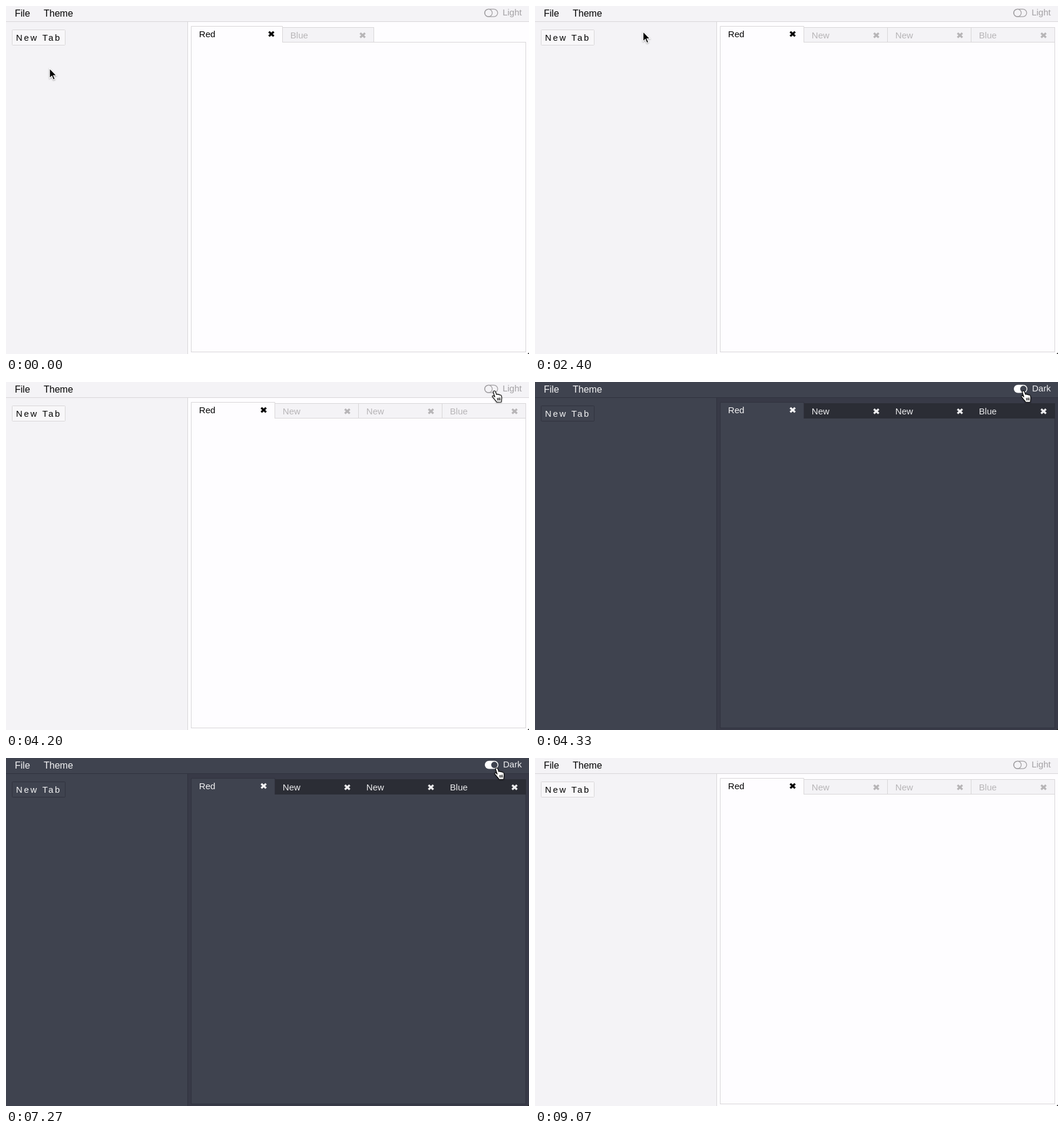
Write an HTML page that moves like this. It is 888x591 px and loops after 9.14 s.

```html
<!DOCTYPE html>
<html lang="en">
<head>
<meta charset="utf-8">
<title>Tabs and themes</title>
<style>
html, body { margin: 0; width: 100%; height: 100%; overflow: hidden; }
svg { display: block; width: 100%; height: 100%; font: 15px "Liberation Sans", Arial, sans-serif; }
#app {
  --bar: #f4f3f6; --page: #fefdff; --line: #d8d6d8; --btn: #f8f7f9;
  --text: #000; --tab: #f4f3f6; --tabline: #d8d6d8; --dim: #b7b5b7; --label: #a3a1a4;
}
#app.dark {
  --bar: #3f434f; --page: #3f434f; --line: #30323e; --btn: #3f434f;
  --text: #f4f4f5; --tab: #2b2d35; --tabline: #2b2d35; --dim: #ececee; --label: #f0f0f2;
}
.back { fill: var(--page); }
.dark .back { fill: #383a47; }
.bar { fill: var(--bar); }
.line { fill: none; stroke: var(--line); }
.page { fill: var(--page); stroke: var(--line); }
.btn { fill: var(--btn); stroke: var(--line); }
.menu { font-size: 16px; }
.menu, .front text, .btntext { fill: var(--text); }
.btntext { letter-spacing: 2.7px; }
.tab rect { fill: var(--tab); stroke: var(--tabline); }
.tab text { fill: var(--dim); }
.x { fill: none; stroke: var(--dim); stroke-width: 3.4; }
.front .x { stroke: var(--text); }
.label { fill: var(--label); text-anchor: end; }
.off { fill: none; stroke: var(--label); stroke-width: 1.3; }
.on, .dark .off { display: none; }
.dark .on { display: inline; }
.arrow { stroke: #fff; stroke-width: 1.2; }
.hand { fill: #fff; stroke: #000; stroke-width: 1.1; stroke-linejoin: round; stroke-linecap: round; }
#cursor { filter: drop-shadow(0 1px 1px rgba(0, 0, 0, .35)); }
</style>
</head>
<body>
<svg id="app" viewBox="0 0 888 591" preserveAspectRatio="none">
  <rect class="back" width="888" height="591"/>
  <path class="bar" d="M0 0H888V27H309V591H0Z"/>
  <path class="line" d="M0 26.5H888M308.5 27V591"/>
  <text class="menu" x="15" y="17.5">File</text>
  <text class="menu" x="64" y="17.5">Theme</text>
  <rect class="btn" x="10.5" y="40.5" width="90" height="26" rx="1"/>
  <text class="btntext" x="17" y="58.7">New Tab</text>

  <g class="off">
    <rect x="812.8" y="5.3" width="22" height="12.8" rx="6.4"/>
    <circle cx="819.2" cy="11.7" r="6.4"/>
  </g>
  <g class="on">
    <rect x="813" y="4.8" width="23" height="13.8" rx="6.9" fill="#fff"/>
    <circle cx="829.2" cy="11.7" r="5.4" fill="#3f434f"/>
  </g>
  <text class="label" id="label" x="875.7" y="16.4"></text>

  <rect class="page" x="314.5" y="61.5" width="568" height="526"/>
  <g id="tabs"></g>
  <path d="M888 588.5V591H885.5Z" fill="#222"/>

  <g id="cursor">
    <path class="arrow" id="arrow" d="M0 0V16.6L3.8 13L6.4 19.3L9.2 18.1L6.6 12H11.8Z"/>
    <g class="hand" id="hand" transform="translate(-6 -1)">
      <path d="M3.3 1.2C4.6 .6 5.6 1.2 6.1 2.5L7.8 7.2C8.6 6.3 10 6.4 10.6 7.5C11.6 6.8 12.8 7 13.3 8.2C14.6 7.6 15.8 8.2 16.2 9.6C16.9 12 17.3 14 16.3 16.6L16 20L8.2 20.3C7.6 18.3 5.5 17 3.8 14.5C2.6 12.8 .9 11.6 .7 10.4C.8 9 2.6 8.9 3.6 10L5 11.3L2.3 3.3C2 2.3 2.4 1.5 3.3 1.2Z"/>
      <path d="M9.3 13.2L9.8 17M11.5 13L11.9 16.8M13.7 12.8L13.9 16.6" fill="none"/>
    </g>
  </g>
</svg>
<script>
const LOOP = 9140;
const $ = id => document.getElementById(id);

// time, x, y of the pointer tip
const path = [
  [0, 74, 106], [400, 72, 78], [870, 66, 45], [1730, 66, 45], [1930, 68, 43], [2330, 68, 43],
  [2400, 183.5, 43.5], [2470, 380, 58], [2530, 570, 72], [2600, 673, 79],
  [3000, 673, 79], [3270, 745, 52], [3530, 822, 22], [3670, 846, 14], [3800, 833, 16],
  [4000, 833, 16], [4130, 831, 15], [7000, 831, 15], [7270, 835, 17], [7530, 835, 17],
  [7800, 846, 180], [8070, 864, 520], [8200, 870, 620], [LOOP, 870, 620]
];

// start of the screen frame that holds t, at 15 per second
function frameStart(t) {
  const at = k => Math.round(k * 20 / 3) * 10;
  const k = Math.floor(t * 0.015);
  return at(k) > t ? at(k - 1) : at(k);
}

function pointAt(t) {
  const i = Math.max(1, path.findIndex(p => p[0] >= t));
  const [t0, x0, y0] = path[i - 1], [t1, x1, y1] = path[i];
  const f = (t - t0) / (t1 - t0);
  return [x0 + (x1 - x0) * f, y0 + (y1 - y0) * f];
}

const inside = (x, y, l, t, r, b) => x >= l && x <= r && y >= t && y <= b;

function drawTabs(count) {
  const w = Math.min(155, 568 / count);
  const parts = [];
  for (let i = count - 1; i >= 0; i--) {
    const left = 314.5 + i * w, front = i === 0;
    const name = front ? "Red" : i === count - 1 ? "Blue" : "New";
    const shape = front
      ? `<path class="page" d="M${left} 62V34.5H${left + w}V62"/>`
      : `<rect x="${left}" y="36.5" width="${w}" height="25"/>`;
    const mid = front ? 47.5 : 49.8;
    parts.push(`<g class="${front ? "front" : "tab"}">${shape}
      <text x="${left + 13.3}" y="${mid + 5}">${name}</text>
      <path class="x" transform="translate(${left + w - 19} ${mid})" d="M-4.1-3.8L4.1 3.8M-4.1 3.8L4.1-3.8"/></g>`);
  }
  $("tabs").innerHTML = parts.join("");
}

const start = performance.now();
let shown = 0;

function draw(now) {
  const t = Math.max(0, now - start) % LOOP;
  const count = t < 1000 ? 2 : t < 1870 ? 3 : 4;
  if (count !== shown) drawTabs(shown = count);

  const dark = t >= 4330 && t < 7530;
  $("app").classList.toggle("dark", dark);
  $("label").textContent = dark ? "Dark" : "Light";

  const [x, y] = pointAt(frameStart(t));
  const hand = inside(x, y, 10, 40, 101, 67) || inside(x, y, 810, 0, 880, 26);
  $("cursor").setAttribute("transform", `translate(${x} ${y})`);
  $("hand").style.display = hand ? "" : "none";
  $("arrow").style.display = hand ? "none" : "";
  requestAnimationFrame(draw);
}
draw(start);
</script>
</body>
</html>
```
